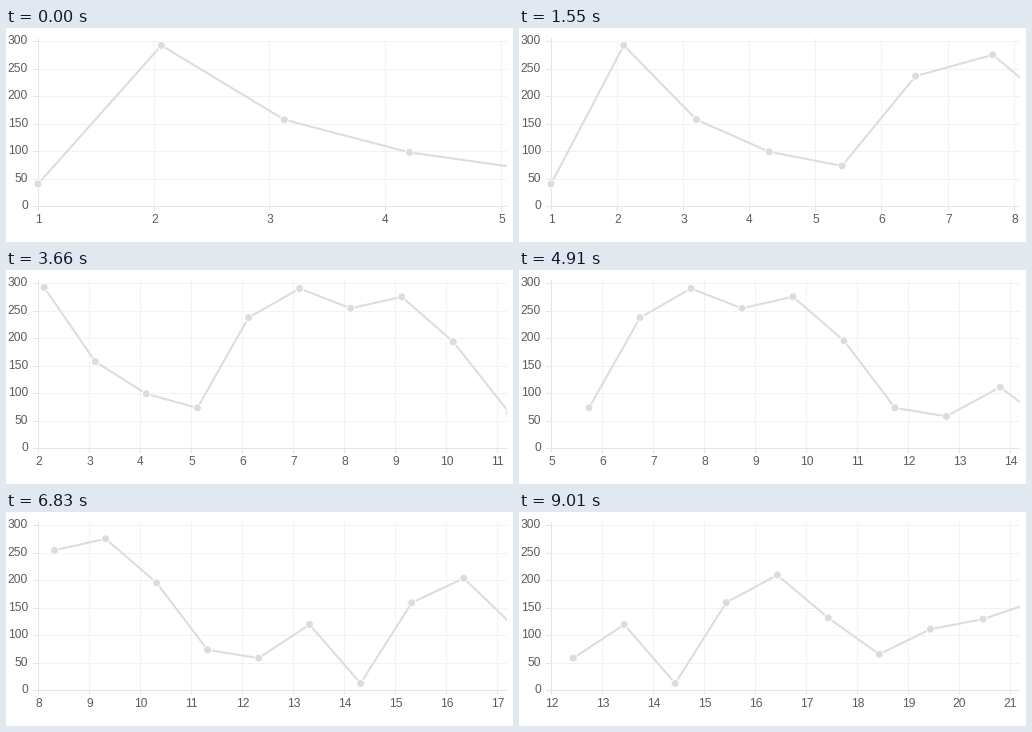
A matplotlib script that plays this animation: 507x214 px, repeating every 9.07 s.

```python
import numpy as np
import matplotlib.pyplot as plt
from matplotlib.animation import FuncAnimation
from matplotlib.collections import LineCollection
from matplotlib.patches import Circle, Rectangle

W, H, DPI = 507, 214, 100
LOOP, FRAMES = 9070, 454
PX = 72 / DPI                      # points per pixel
LEFT, EDGE, TOP, BASE = 32, 501, 13, 178
DIGIT = 6.67                       # width of one digit
WINDOW = 10                        # most points kept on the chart
GLIDE = 1270                       # length of one transition, ms

VALUES = [40, 292, 157, 98.5, 73, 237, 290, 254, 275, 195, 73,
          58, 119, 12, 159, 209, 131, 65, 111, 134, 281]
YS = BASE - np.array(VALUES) * (BASE - TOP) / 300
COUNT = len(VALUES)

# Moment at which the n-th value is pushed, for n = 1..COUNT
ARRIVE = np.interp(np.arange(1, COUNT + 1),
                   [1, 5, 7, 8, 11, 14, 17, 19, 21],
                   [-2948, -448, 803, 1363, 3143, 4782, 6488, 7638, 8756])


def ease_out(p):
    return 1 - (1 - np.clip(p, 0, 1)) ** 4


def first_of(n):
    return max(1, n - WINDOW + 1)


def column(n, index):
    """x of a grid column once n values have been pushed."""
    right = EDGE - 3 - DIGIT * len(str(n)) / 2
    shown = n - first_of(n) + 1
    return np.round(LEFT + (right - LEFT) / max(shown - 1, 1) * index)


def columns(n):
    return column(n, np.arange(n - first_of(n) + 1))


def glide(n, start, t):
    """Points on the way from their start to their place at time t."""
    e = ease_out((t - ARRIVE[n - 1]) / GLIDE)
    x, y = start
    return x + (columns(n) - x) * e, y + (YS[first_of(n) - 1:n] - y) * e


def build_starts():
    """Where the points stand at each push; unfinished moves carry over."""
    starts = [(np.array([float(LEFT)]), YS[:1])]
    for n in range(2, COUNT + 1):
        x, y = glide(n - 1, starts[-1], ARRIVE[n - 1])
        x = np.append(x, column(n - 1, len(x) + 1))
        y = np.append(y, BASE)
        starts.append((x[-WINDOW:], y[-WINDOW:]))
    return starts


STARTS = build_starts()

fig = plt.figure(figsize=(W / DPI, H / DPI), dpi=DPI, facecolor="white")
ax = fig.add_axes([0, 0, 1, 1])
ax.set_xlim(0, W)
ax.set_ylim(H, 0)
ax.axis("off")

GRID, AXIS = "#f2f2f2", "#e5e5e5"
FONT = dict(family="Liberation Sans", size=12 * PX, color="#5c5c5c",
            va="baseline")


def strokes(color, z, segments=()):
    # Lines already sit on pixel centres, so snapping would move them
    lines = LineCollection(segments, colors=color, linewidths=PX, zorder=z,
                           snap=False, capstyle="butt")
    return ax.add_collection(lines, autolim=False)


rows = [int(BASE - 27.5 * i + 0.5) + 0.5 for i in range(7)]
strokes(GRID, 1, [[(LEFT, y), (EDGE, y)] for y in rows[1:]])
strokes(AXIS, 2, [[(LEFT - 5, y), (LEFT, y)] for y in rows]
        + [[(LEFT, rows[0]), (EDGE, rows[0])],
           [(LEFT + 0.5, TOP - 3), (LEFT + 0.5, BASE + 5)]])
for i, y in enumerate(rows):
    ax.text(LEFT - 10, y + 2.7, str(50 * i), ha="right", **FONT)

uprights = strokes(GRID, 1)
ticks = strokes(AXIS, 2)
x_labels = [ax.text(0, 195, "", ha="center", **FONT) for _ in range(WINDOW)]

clip = Rectangle((0, 0), EDGE, H, transform=ax.transData)
curve, = ax.plot([], [], color="#dcdcdc", lw=2 * PX, zorder=4, snap=False,
                 solid_joinstyle="miter", solid_capstyle="butt")
curve.set_clip_path(clip)
dots = []
for _ in range(WINDOW):
    dot = Circle((0, 0), 4, fc="#dcdcdc", ec="white", lw=PX, zorder=5)
    ax.add_patch(dot)
    dot.set_clip_path(clip)
    dots.append(dot)


def draw(frame):
    t = (frame + 0.5) * LOOP / FRAMES
    n = int(np.searchsorted(ARRIVE, t, side="right"))
    cols = columns(n) + 0.5
    uprights.set_segments([[(c, TOP - 3), (c, BASE)] for c in cols[1:]])
    ticks.set_segments([[(c, BASE), (c, BASE + 5)] for c in cols[1:]])

    x, y = glide(n, STARTS[n - 1], t)
    curve.set_data(x, y)
    for i, (label, dot) in enumerate(zip(x_labels, dots)):
        used = i < len(cols)
        label.set_visible(used)
        dot.set_visible(used)
        if used:
            label.set_text(str(first_of(n) + i))
            label.set_x(cols[i])
            dot.center = x[i], y[i]
    return [uprights, ticks, curve, *x_labels, *dots]


anim = FuncAnimation(fig, draw, frames=FRAMES, interval=LOOP / FRAMES,
                     init_func=lambda: draw(0), repeat=True, repeat_delay=0)
plt.show()
```
